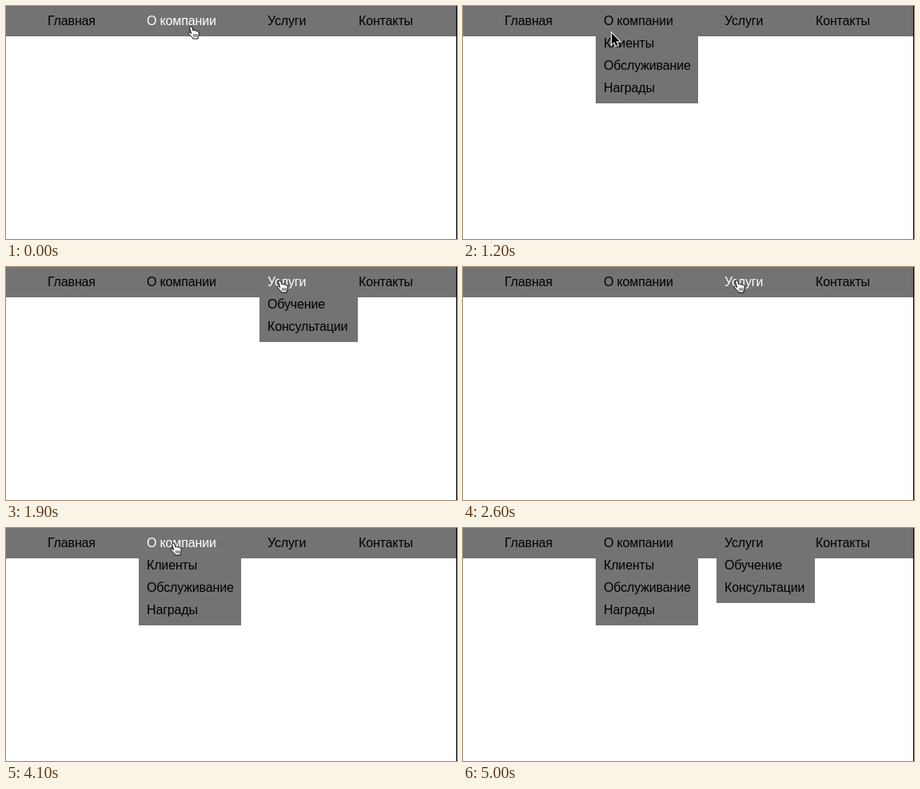
An HTML page that plays this animation: 564x292 px, repeating every 5.4 s.

```html
<!DOCTYPE html>
<html lang="ru">
<head>
<meta charset="utf-8">
<title>Меню</title>
<style>
html, body { margin: 0; width: 100%; height: 100%; overflow: hidden; background: #fff; }
svg { display: block; width: 564px; height: 292px; }
text { font: 16px "Liberation Sans", Arial, sans-serif; letter-spacing: -.15px; fill: #000; }
.panel { fill: #737373; }

/* Hard changes only: each state holds until the next key */
.about, .services, .menu1, .menu2, .cursor, .hand, .arrow { animation: 5.4s step-end infinite; }
.about { animation-name: about; }
.services { animation-name: services; }
.menu1 { animation-name: menu1; }
.menu2 { animation-name: menu2; }
.cursor { animation-name: move; }
.hand { animation-name: hand; }
.arrow { animation-name: arrow; }

@keyframes about {
  0%, 24.07%, 74.07% { fill: #fff; }
  12.96%, 27.77%, 77.77%, 100% { fill: #000; }
}
@keyframes services {
  0%, 53.7%, 90.74%, 100% { fill: #000; }
  31.48%, 81.48% { fill: #fff; }
}
@keyframes menu1 {
  0%, 24.07% { opacity: 0; }
  3.7%, 75.92%, 100% { opacity: 1; }
}
@keyframes menu2 {
  0%, 48.14% { opacity: 0; }
  33.33%, 85.18%, 100% { opacity: 1; }
}
@keyframes hand {
  0%, 24.07%, 31.48%, 74.07%, 81.48% { opacity: 1; }
  12.96%, 27.77%, 53.7%, 77.77%, 90.74%, 100% { opacity: 0; }
}
@keyframes arrow {
  0%, 24.07%, 31.48%, 74.07%, 81.48%, 92.59%, 100% { opacity: 0; }
  12.96%, 27.77%, 70.37%, 77.77%, 90.74% { opacity: 1; }
}
@keyframes move {
  0% { transform: translate(227px, 25px); }
  12.96% { transform: translate(195px, 30px); }
  14.81% { transform: translate(158px, 46px); }
  16.66% { transform: translate(140px, 66px); }
  18.51% { transform: translate(136px, 70px); }
  20.37% { transform: translate(147px, 60px); }
  22.22% { transform: translate(186px, 34px); }
  24.07% { transform: translate(215px, 20px); }
  27.77% { transform: translate(272px, 16px); }
  29.62% { transform: translate(312px, 10px); }
  31.48% { transform: translate(338px, 16px); }
  70.37% { transform: translate(235px, 79px); }
  72.22% { transform: translate(62px, 60px); }
  74.07% { transform: translate(205px, 18px); }
  77.77% { transform: translate(494px, 58px); }
  79.62% { transform: translate(300px, 50px); }
  81.48% { transform: translate(340px, 14px); }
  83.33% { transform: translate(344px, 12px); }
  90.74%, 100% { transform: translate(350px, 2px); }
}
</style>
</head>
<body>
<svg viewBox="0 0 564 292">
  <rect class="panel" width="563" height="38"/>
  <rect x="563" width="1" height="292"/>

  <text x="52" y="24">Главная</text>
  <text class="about" x="176" y="24">О компании</text>
  <text class="services" x="327" y="24">Услуги</text>
  <text x="441" y="24">Контакты</text>

  <g class="menu1">
    <rect class="panel" x="166" y="38" width="128" height="84"/>
    <text x="176" y="52">Клиенты</text>
    <text x="176" y="80">Обслуживание</text>
    <text x="176" y="108">Награды</text>
  </g>
  <g class="menu2">
    <rect class="panel" x="317" y="38" width="123" height="56"/>
    <text x="327" y="52">Обучение</text>
    <text x="327" y="80">Консультации</text>
  </g>

  <g class="cursor">
    <g class="hand" stroke="#000" stroke-linejoin="round" stroke-linecap="round">
      <path fill="#fff" d="M3.2 1.2C4.2.2 5.4.7 5.8 2L7.2 6C7.8 5 9 5.2 9.4 6.2C10.2 5.4 11.4 5.8 11.7 6.8C12.6 6.2 13.8 6.8 14 8C14.4 10 14.2 12 13.3 13.6L13 16H6.8C6 14 3.4 12 1.2 9.4C.6 8.2 2 7.4 3.2 8.3L4.6 9.6L2.7 3C2.5 2.2 2.7 1.6 3.2 1.2Z"/>
      <path fill="none" stroke-width=".8" d="M7.8 10.5V13.5M9.8 10.5V13.5M11.8 10.5V13.5"/>
    </g>
    <path class="arrow" stroke="#fff" stroke-width="2" paint-order="stroke" d="M0 0V14L3.2 11L5.3 16L7.5 15L5.4 10.2H9.8Z"/>
  </g>
</svg>
</body>
</html>
```
